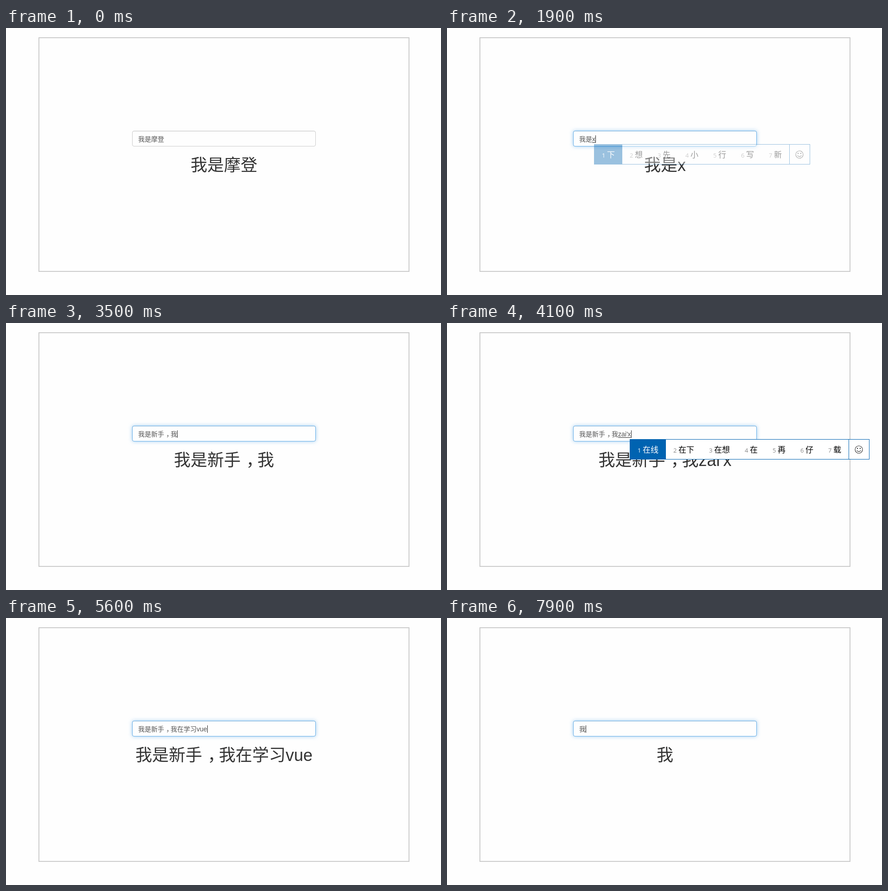
An HTML page that plays this animation: 938x577 px, repeating every 8000 ms.

```html
<!DOCTYPE html>
<html lang="zh-CN">
<head>
<meta charset="utf-8">
<title>Input binding</title>
<style>
  html, body { margin: 0; width: 100%; height: 100%; overflow: hidden; background: #fefefe; }
  #stage { position: relative; width: 938px; height: 577px; overflow: hidden; background: #fefefe;
    font-family: "Liberation Sans", "Noto Sans CJK SC", sans-serif; }
  #stage > * { position: absolute; box-sizing: border-box; white-space: pre; }
  #panel { left: 70px; top: 20px; width: 800px; height: 507px; border: 2px solid #ccc; }
  .field { left: 272px; top: 222px; width: 396px; height: 34px; border: 1px solid #ccc; border-radius: 4px;
    background: #fefefe; box-shadow: inset 0 1px 1px rgba(0,0,0,.075); }
  #focus { border-color: #66afe9; box-shadow: inset 0 1px 1px rgba(0,0,0,.075), 0 0 8px rgba(102,175,233,.6); }
  #value { left: 285px; top: 230px; font-size: 14px; line-height: 20px; color: #555; }
  #value u { position: relative; text-decoration: none; }
  #value u::after { content: ""; position: absolute; left: 0; right: 0; bottom: 0; height: 1px; background: #222; }
  #caret { top: 232px; width: 1px; height: 16px; background: #222; }
  #title { left: 0; top: 277px; width: 940px; text-align: center; font-size: 36px; line-height: 40px; color: #333; }
  i { font-style: normal; position: relative; left: .33em; }
  #ime { top: 251px; height: 44px; display: flex; border: 1px solid #0063b1; background: #fff; color: #000;
    font: 17px/42px "Noto Sans CJK SC", sans-serif; }
  #ime.tall { width: 540px; height: 87px; }
  #ime span { box-sizing: border-box; flex: none; height: 42px; padding-left: 16px; }
  #ime span:first-child { background: #0063b1; color: #fff; }
  #ime b { display: inline-block; width: 11px; font: 13px/1 "Open Sans", sans-serif; color: #888; }
  #ime span:first-child b { color: #fff; }
  #ime svg { flex: none; box-sizing: border-box; width: 44px; height: 42px; border-left: 1px solid #0063b1;
    fill: none; stroke: #333; stroke-width: 1.2; }
  #ime.tall svg { display: none; }
</style>
</head>
<body>
<div id="stage">
  <div id="panel"></div>
  <div class="field"></div>
  <div class="field" id="focus"></div>
  <div id="value"></div>
  <div id="caret"></div>
  <div id="title"></div>
  <div id="ime"></div>
</div>
<script>
const LOOP = 8000;
const $ = id => document.getElementById(id);

const xinS = '新生 心思 新手 心事 新书 心神 新式';
const xinShou = '新手 心手 新收 新守 新 心 信';
const study = '在学习 再学习 在学 再学 在 再 仔';
const base = '我是新手，我';
const full = base + '在学习';

// time, committed text, composing text, candidates, options
const steps = [
  [0, '我是摩登'],
  [1400, '我是摩'],
  [1600, '我是'],
  [1900, '我是', 'x', '下 想 先 小 行 写 新', { alpha: .39 }],
  [2000, '我是', 'xi', '系 西 洗 喜 细 戏 吸'],
  [2100, '我是', 'xin', '新 心 信 欣 辛 馨 薪'],
  [2200, '我是', "xin's", xinS],
  [2400, '我是', "xin'sh", xinS],
  [2500, '我是', "xin'sho", xinShou],
  [2600, '我是', "xin'shou", xinShou],
  [2900, '我是新手，'],
  [3200, '我是新手，', 'w', '我 为 无 万 问 玩 晚', { alpha: .39 }],
  [3300, '我是新手，', 'w', '我 为 无 万 问 玩 晚'],
  [3500, base],
  [3700, base, 'z', '在 这 中 着 做 再 自', { alpha: .39 }],
  [3800, base, 'za', '咋 杂 砸 扎 咱 匝 咂'],
  [3900, base, 'zai', '在 再 载 仔 宰 灾 栽'],
  [4100, base, "zai'x", '在线 在下 在想 在 再 仔 载'],
  [4200, base, "zai'xu", '再续 在 再 仔 载 宰 灾'],
  [4300, base, "zai'xue", '在学 再学 在 再 仔 载 灾'],
  [4400, base, "zai'xue'x", study],
  [4500, base, "zai'xue'xi", study, { left: 419 }],
  [4600, base, "zai'xue'xi", study],
  [4700, full],
  [5100, full, 'v', 'v', { alpha: .39, tall: true }],
  [5200, full, 'v', 'v', { tall: true }],
  [5300, full, 'vu', 'vu'],
  [5400, full, 'vue', 'vue'],
  [5600, full + 'vue'],
  [6400, full + 'vu'],
  [6600, full + 'v'],
  [6700, full],
  [6900, base + '在学'],
  [7000, base + '在'],
  [7200, base],
  [7300, '我是新手，'],
  [7500, '我是新手'],
  [7600, '我是新'],
  [7700, '我是'],
  [7900, '我']
];
const blinks = [[0, 0], [600, 1], [1200, 0], [1600, 1], [6100, 0], [6600, 1], [7000, 0], [7500, 1]];
const glow = [[0, 0], [600, .3], [700, .85], [800, 1]];

const smiley = '<svg viewBox="0 0 44 42"><circle cx="21.5" cy="21.5" r="8.2"/>' +
  '<path d="M17 23.5q4.5 5 9 0"/><g fill="#333" stroke="none">' +
  '<circle cx="18.5" cy="19" r="1.2"/><circle cx="24.5" cy="19" r="1.2"/></g></svg>';

const at = (table, t) => table.findLast(row => row[0] <= t);
const markup = s => s.replace('，', '<i>，</i>');
const itemWidth = word => /^[a-z]/.test(word) ? 62 : 43 + 17 * word.length;

function candidates(list) {
  return list.split(' ').map((word, n) =>
    `<span style="width:${itemWidth(word)}px"><b>${n + 1}</b>${word}</span>`).join('') + smiley;
}

function show([, text, comp = '', list = '', opt = {}]) {
  const value = $('value'), ime = $('ime');
  value.innerHTML = markup(text) + (comp && `<u>${comp}</u>`);
  $('title').innerHTML = markup(text + comp);
  const end = Math.round(value.getBoundingClientRect().right);
  $('caret').style.left = end + 'px';
  ime.style.display = list ? 'flex' : 'none';
  if (!list) return;
  ime.innerHTML = candidates(list);
  ime.className = opt.tall ? 'tall' : '';
  ime.style.left = (opt.left || end - 3) + 'px';
  ime.style.opacity = opt.alpha || 1;
}

let current;
function frame() {
  const t = performance.now() % LOOP;
  const step = at(steps, t);
  if (step !== current) show(current = step);
  $('caret').style.opacity = at(blinks, t)[1];
  $('focus').style.opacity = at(glow, t)[1];
  requestAnimationFrame(frame);
}
frame();
</script>
</body>
</html>
```
